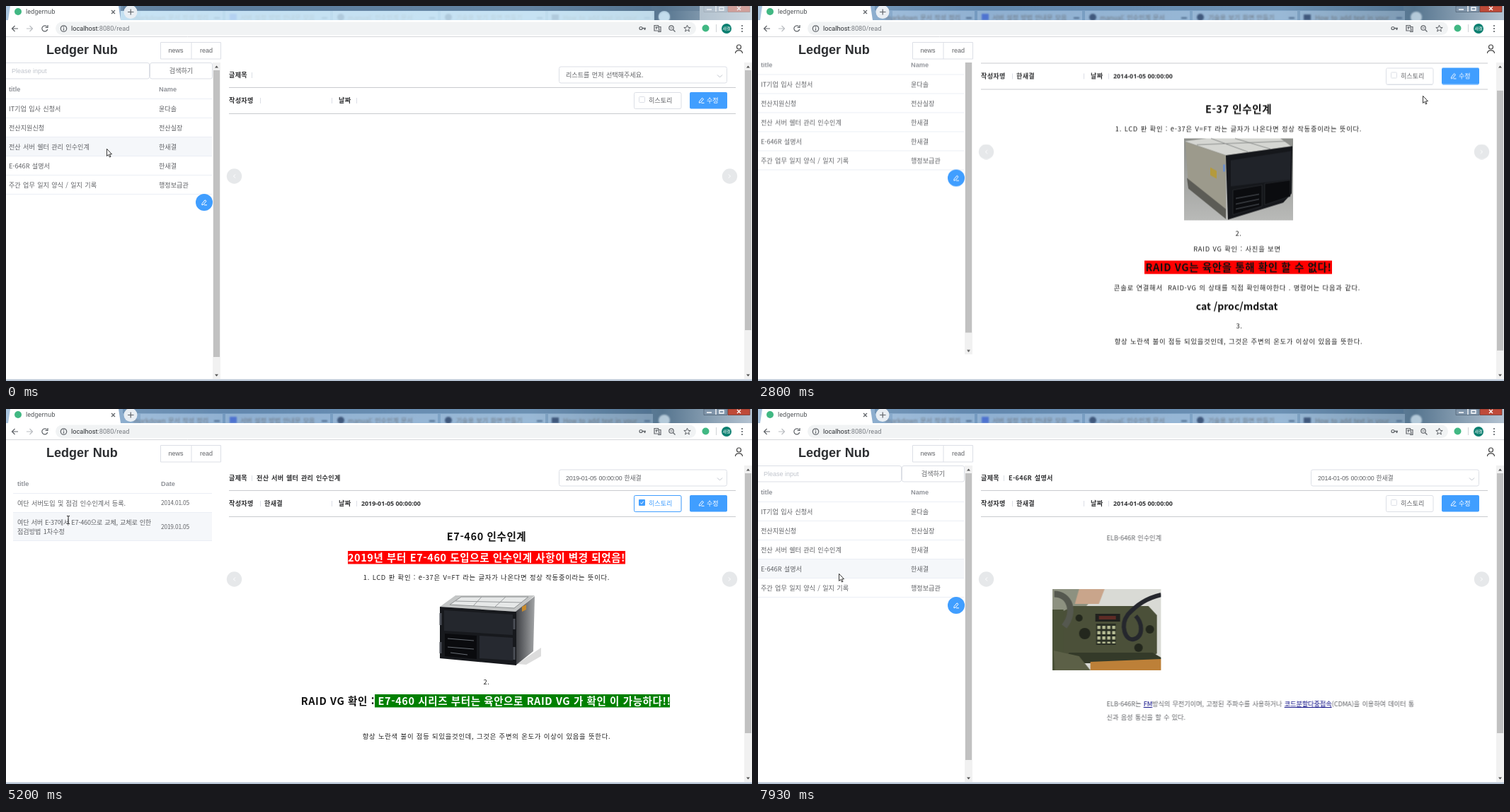
Write an HTML page that moves like this. It is 1054x531 px and loops after 8000 ms.

```html
<!DOCTYPE html>
<html lang="ko">
<head>
<meta charset="utf-8">
<title>ledgernub</title>
<style>
html, body { margin: 0; width: 100%; height: 100%; overflow: hidden; background: #fff; }
svg { display: block; width: 1054px; height: 531px; }
text { font: 9.1px "Noto Sans CJK KR", "Noto Sans", sans-serif; fill: #606266; word-spacing: .8px; white-space: pre; }
.en { font: 9px "Liberation Sans", Arial, sans-serif; word-spacing: 0; }
.th { font: bold 9.2px "Liberation Sans", Arial, sans-serif; fill: #909399; }
.b { font-weight: 700; letter-spacing: .3px; fill: #303133; }
.date { font: 600 8.85px "Noto Sans", sans-serif; fill: #303133; word-spacing: 0; }
.day { font-size: 8.4px; letter-spacing: -.2px; }
.pick { font: 8.9px "Liberation Sans", "Noto Sans CJK KR", sans-serif; letter-spacing: -.2px; }
.mid, .body text { text-anchor: middle; }
.body text { font-size: 9.4px; letter-spacing: .7px; word-spacing: .3px; fill: #222; }
.body .h { font-size: 14.5px; font-weight: 700; letter-spacing: .6px; word-spacing: 0; fill: #111; }
.body .cmd { font-size: 14px; letter-spacing: 0; }
.body .w { fill: #fff; }
.body .l { text-anchor: start; }
.body .r { text-anchor: end; }
.link { fill: #000080; text-decoration: underline; }
.box { fill: #fff; stroke: #dcdfe6; }
.line { stroke: #ebeef5; }
.ico { fill: none; stroke: #5f6368; stroke-width: 1.2; }
.hov { fill: #f5f7fa; }

/* s: hard cuts, f: fades, m: motion */
.s { animation: 8s step-end infinite; }
.f { animation: 8s linear infinite; }
.m { animation: 8s ease-in-out infinite; }
@keyframes focus { 0% { opacity: 1 } 11.625%, to { opacity: 0 } }
@keyframes empty { 0% { opacity: 1 } 13.375%, to { opacity: 0 } }
@keyframes loaded { 0% { opacity: 0 } 13.375%, to { opacity: 1 } }
@keyframes docA { 0% { opacity: 0 } 13.375% { opacity: 1 } 95.875%, to { opacity: 0 } }
@keyframes docB { 0% { opacity: 0 } 95.875%, to { opacity: 1 } }
@keyframes oldRev { 0% { opacity: 0 } 13.375% { opacity: 1 } 60% { opacity: 0 } 95.875%, to { opacity: 1 } }
@keyframes newRev { 0% { opacity: 0 } 60% { opacity: 1 } 95.875%, to { opacity: 0 } }
@keyframes list { 0% { opacity: 1 } 42.5% { opacity: 0 } 82.5%, to { opacity: 1 } }
@keyframes history { 0% { opacity: 0 } 42.5% { opacity: 1 } 82.5%, to { opacity: 0 } }
@keyframes checked { 0%, 42.4% { opacity: 0 } 44.5%, 82.4% { opacity: 1 } 84.5%, to { opacity: 0 } }
@keyframes ring { 0% { opacity: 0 } 82.5% { opacity: 1 } 95.875%, to { opacity: 0 } }
@keyframes row3 { 0%, 18.4% { opacity: 1 } 21.3%, to { opacity: 0 } }
@keyframes row4 { 0%, 89% { opacity: 0 } 91.5%, to { opacity: 1 } }
@keyframes old { 0%, 48.8% { opacity: 0 } 51.6%, 55% { opacity: 1 } 57.5%, to { opacity: 0 } }
@keyframes new { 0%, 45.8% { opacity: 0 } 47.8%, 49.4% { opacity: 1 } 51.9%, 55% { opacity: 0 } 57.5%, 72% { opacity: 1 } 75%, to { opacity: 0 } }
@keyframes edit { 0%, 75.6% { opacity: 0 } 76.5%, 78% { opacity: 1 } 79%, to { opacity: 0 } }
@keyframes scroll {
  0%, 27.5% { transform: translateY(0) } 30%, 33.75% { transform: translateY(-72px) }
  35%, 35.8% { transform: translateY(-34.5px) } 37.2%, to { transform: translateY(0) }
}
@keyframes thumb {
  0%, 27.5% { transform: translateY(0) } 30%, 33.75% { transform: translateY(60px) }
  35%, 35.8% { transform: translateY(28.8px) } 37.2%, to { transform: translateY(0) }
}
@keyframes leave { 0%, 60% { transform: translateX(0) } 65%, to { transform: translateX(-740px) } }
@keyframes enter { 0%, 60% { transform: translateX(740px) } 65%, to { transform: translateX(0) } }
@keyframes backIn { 0% { transform: translateX(-740px) } 5%, to { transform: translateX(0) } }
@keyframes backOut { 0% { transform: translateX(0) } 5%, to { transform: translateX(740px) } }
.back { animation-delay: -.33s; }
@keyframes mouse {
  0%, 16% { transform: translate(142px, 202px) }
  22.4%, 24.1% { transform: translate(937px, 145px) }
  26.6% { transform: translate(934px, 148px) }
  30%, 35.8% { transform: translate(939px, 127px) }
  37.5%, 42.5% { transform: translate(929px, 146px) }
  47.5% { transform: translate(88px, 175px) }
  49.1%, 50% { transform: translate(88px, 140px) }
  51.6%, 53.3% { transform: translate(88px, 138px) }
  56.6%, 70.8% { transform: translate(88px, 157px) }
  77.2% { transform: translate(985px, 136px) }
  80%, 82.5% { transform: translate(925px, 134px) }
  91.6%, to { transform: translate(114px, 233px) }
}
@keyframes arrow { 0% { opacity: 1 } 21.6% { opacity: 0 } 27.5% { opacity: 1 } 38.375% { opacity: 0 } 43.2% { opacity: 1 } 55% { opacity: 0 } 71.8% { opacity: 1 } 76.5% { opacity: 0 } 83.2%, to { opacity: 1 } }
@keyframes hand { 0% { opacity: 0 } 21.6% { opacity: 1 } 27.5% { opacity: 0 } 38.375% { opacity: 1 } 43.2% { opacity: 0 } 76.5% { opacity: 1 } 83.2%, to { opacity: 0 } }
@keyframes beam { 0% { opacity: 0 } 55% { opacity: 1 } 71.8%, to { opacity: 0 } }
</style>
</head>
<body>
<svg viewBox="0 0 1054 531">
<defs>
  <clipPath id="view"><path d="M0 80H1043V528H0z"/></clipPath>
  <clipPath id="stage"><path d="M303 153H1043V600H303z"/></clipPath>
  <clipPath id="photo"><path d="M602 255H756V370H602z"/></clipPath>
  <linearGradient id="glass">
    <stop stop-color="#a9c4de"/><stop offset=".3" stop-color="#7399bf"/>
    <stop offset=".7" stop-color="#83a7c8"/><stop offset=".88" stop-color="#56758f"/><stop offset="1" stop-color="#b4c3d1"/>
  </linearGradient>
  <linearGradient id="steel"><stop stop-color="#3c3e42"/><stop offset="1" stop-color="#a2a4a6"/></linearGradient>
  <linearGradient id="floor" x2="0" y2="1"><stop stop-color="#8d8f8b"/><stop offset="1" stop-color="#b9bab8"/></linearGradient>
  <filter id="blur"><feGaussianBlur stdDeviation="1.3 .9"/></filter>
  <g id="pen" fill="none" stroke="#fff" stroke-width="1"><path d="M-3 1.8L1-3.2L3-1.7L-1 3.2L-3.2 3.6zM0 3.8H4"/></g>
  <path id="up" d="M-2.5 1.5L0-1.5L2.5 1.5z" fill="#505050"/>
  <g id="radio">
    <text class="h" x="679" y="186">ELB-646R 인수인계</text>
    <g clip-path="url(#photo)">
      <path d="M602 255H756V370H602z" fill="#d9dad5"/>
      <path d="M602 255H670L648 282L602 290z" fill="#8d9180"/>
      <path d="M640 255H676L668 276H634z" fill="#c9a58b"/>
      <path d="M602 284H618V370H602z" fill="#4a5138"/>
      <path d="M618 286L632 279H738L750 292V346L738 357H630L618 346z" fill="#4b5039"/>
      <path d="M626 345H744L756 352V360H616z" fill="#343a29"/>
      <path d="M656 358L756 354V370H656z" fill="#bd8038"/>
      <path d="M604 342L640 350L656 370H606z" fill="#5c6047"/>
      <path d="M663 290H698V301H663z" fill="#20211e"/><path d="M668 293H692V298H668z" fill="#5d2b25"/>
      <path d="M664 304H692V334H664z" fill="#2b3025"/>
      <path d="M668 307V332M675 307V332M682 307V332M689 307V332" stroke="#b6bc94" stroke-width="4.5" stroke-dasharray="4.5 3"/>
      <g fill="#23271d"><circle cx="648" cy="318" r="8"/><circle cx="640" cy="296" r="5"/><circle cx="724" cy="338" r="6"/><circle cx="740" cy="312" r="6"/></g>
      <path d="M605 262C626 262 636 286 619 308" fill="none" stroke="#55584f" stroke-width="9"/>
      <path d="M756 263C735 268 722 277 709 291C697 307 706 329 717 326C732 322 729 302 720 293" fill="none" stroke="#25272d" stroke-width="6"/>
    </g>
    <text class="h" x="679" y="421">ELB-646R는 <tspan class="link">FM</tspan>방식의 무전기이며, 고정된 주파수를 사용하거나 <tspan class="link">코드분할다중접속</tspan>(CDMA)을 이용하여 데이터 통</text>
    <text class="h" x="679" y="440">신과 음성 통신을 할 수 있다.</text>
  </g>
</defs>
<path d="M0 0H1054V531H0z" fill="#fff"/>

<g clip-path="url(#view)"><g class="f" style="animation-name:scroll">
  <!-- document list -->
  <g class="s" style="animation-name:list">
    <path class="hov f" style="animation-name:row3" d="M0 185H291V212H0z"/>
    <path class="hov f" style="animation-name:row4" d="M0 212H291V239H0z"/>
    <path class="line" d="M0 131.500H291M0 158.500H291M0 185.500H291M0 212.500H291M0 239.500H291M0 266.500H291"/>
    <rect class="box" x="-2.500" y="80.500" width="205" height="22.500" rx="2.500"/>
    <rect class="box" x="203.500" y="80.500" width="88" height="22.500" rx="2.500"/>
    <text class="en" x="8" y="94.500" style="fill:#c0c4cc">Please input</text>
    <text class="mid" x="247.500" y="95">검색하기</text>
    <text class="th" x="4" y="121">title</text><text class="th" x="216" y="121">Name</text>
    <text x="4" y="148.500">IT기업 입사 신청서</text><text x="216" y="148.500">윤다솔</text>
    <text x="4" y="175.500">전산지원신청</text><text x="216" y="175.500">전산실장</text>
    <text x="4" y="202.500">전산 서버 쉘터 관리 인수인계</text><text x="216" y="202.500">한새결</text>
    <text x="4" y="229.500">E-646R 설명서</text><text x="216" y="229.500">한새결</text>
    <text x="4" y="256.500">주간 업무 일지 양식 / 일지 기록</text><text x="216" y="256.500">행정보급관</text>
    <circle cx="280" cy="278" r="12" fill="#409eff"/><use href="#pen" x="280" y="278"/>
    <path d="M292 80H303V528H292z" fill="#f1f1f1"/><path d="M293 91H302V497H293z" fill="#c1c1c1"/>
    <use href="#up" x="297.500" y="86"/><use href="#up" transform="translate(297.5 523) scale(1 -1)"/>
  </g>

  <!-- revision list -->
  <g class="s" style="animation-name:history">
    <path class="hov f" style="animation-name:old" d="M10 119H291V146H10z"/>
    <path class="hov f" style="animation-name:new" d="M10 146H291V187H10z"/>
    <path class="line" d="M10 119.500H291M10 146.500H291M10 186.500H291"/>
    <text class="th" x="16" y="109">title</text><text class="th" x="219" y="109">Date</text>
    <text x="16" y="136.500">여단 서버도입 및 점검 인수인계서 등록.</text><text class="day" x="219" y="136">2014.01.05</text>
    <text x="16" y="163.500" style="letter-spacing:-.2px">여단 서버 E-37에서 E7-460으로 교체, 교체로 인한</text>
    <text x="16" y="176.500">점검방법 1차수정</text><text class="day" x="219" y="170">2019.01.05</text>
  </g>

  <!-- document head -->
  <path d="M315 115.500H1031M315 152.500H1031" stroke="#c9cbce"/>
  <path d="M347.500 94V102M359.500 130V138M460.500 130V138M495.500 130V138" stroke="#dcdfe6"/>
  <text class="b" x="315" y="101">글제목</text>
  <text class="b" x="315" y="137">작성자명</text>
  <text class="b" x="470" y="137">날짜</text>
  <text class="b s" style="animation-name:docA" x="354" y="101">전산 서버 쉘터 관리 인수인계</text>
  <text class="b s" style="animation-name:docB" x="354" y="101">E-646R 설명서</text>
  <text class="b s" style="animation-name:loaded" x="365" y="137">한새결</text>
  <text class="date s" style="animation-name:oldRev" x="502" y="136.500">2014-01-05 00:00:00</text>
  <text class="date s" style="animation-name:newRev" x="502" y="136.500">2019-01-05 00:00:00</text>
  <rect class="box" x="781.500" y="86" width="237" height="23" rx="2.500"/>
  <path d="M1005 97.500L1008.500 101L1012 97.500" fill="none" stroke="#c0c4cc"/>
  <text class="s" style="animation-name:empty" x="791" y="101">리스트를 먼저 선택해주세요.</text>
  <text class="pick s" style="animation-name:oldRev" x="791" y="100.500">2014-01-05 00:00:00 한새결</text>
  <text class="pick s" style="animation-name:newRev" x="791" y="100.500">2019-01-05 00:00:00 한새결</text>
  <rect class="box" x="887.500" y="122.500" width="66.500" height="23" rx="2"/>
  <rect class="box" x="894.500" y="128.500" width="8" height="8" rx="1"/>
  <text x="908" y="136.500">히스토리</text>
  <rect class="s" style="animation-name:ring" x="894.500" y="128.500" width="8" height="8" rx="1" fill="none" stroke="#409eff"/>
  <g class="f" style="animation-name:checked">
    <rect x="887.500" y="122.500" width="66.500" height="23" rx="2" fill="#fff" stroke="#409eff"/>
    <rect x="894" y="128" width="9" height="9" rx="1" fill="#409eff"/>
    <path d="M896.300 132.600L898 134.400L900.800 130.600" fill="none" stroke="#fff"/>
    <text x="908" y="136.500" style="fill:#409eff">히스토리</text>
  </g>
  <rect x="966" y="122" width="53" height="23.500" rx="2" fill="#409eff"/>
  <rect class="f" style="animation-name:edit" x="966" y="122" width="53" height="23.500" rx="2" fill="#66b1ff"/>
  <use href="#pen" x="982.500" y="133.500"/><text x="990" y="137" style="fill:#fff">수정</text>

  <!-- carousel -->
  <g class="body" clip-path="url(#stage)">
    <g class="s" style="animation-name:loaded"><g class="m" style="animation-name:leave">
      <text class="h" x="679" y="186">E-37 인수인계</text>
      <text x="679" y="211.500">1. LCD 판 확인 : e-37은 V=FT 라는 글자가 나온다면 정상 작동중이라는 뜻이다.</text>
      <path d="M602 222H756V338H602z" fill="url(#floor)"/>
      <path d="M603 226L634 222H738L753 233L662 246z" fill="#d5d6d2"/>
      <path d="M640 222L692 241M674 222L724 237M620 231L745 226" stroke="#8b8d8c" fill="none"/>
      <path d="M604 227L661 246V336L608 291z" fill="#9c9a8c"/>
      <path d="M606 278L661 322V336L608 293z" fill="#5c5c56"/>
      <path d="M661 246L755 233L754 300L742 313L664 337z" fill="#15171b"/>
      <path d="M668 253L753 240L752 280L668 290z" fill="#202329"/>
      <path d="M671 295L712 288V318L671 330zM716 286L752 281V304L716 316z" fill="#0b0c0f" stroke="#33363c" stroke-width=".6"/>
      <path d="M675 307L708 301M675 315L708 308M675 322L708 315" stroke="#555a60"/>
      <path d="M639 263L648 268V279L639 274z" fill="#b49a3d"/><path d="M657 259H660V269H657z" fill="#6f8fc6"/>
      <text x="679" y="359.500">2.</text>
      <text x="677" y="381.500">RAID VG 확인 : 사진을 보면</text>
      <path d="M546 395H811V414H546z" fill="#f00"/>
      <text class="h" x="679" y="410">RAID VG는 육안을 통해 확인 할 수 없다!</text>
      <text x="677" y="436.500">콘솔로 연결해서  RAID-VG 의 상태를 직접 확인해야한다 . 명령어는 다음과 같다.</text>
      <text class="h cmd" x="676.500" y="465">cat /proc/mdstat</text>
      <text x="680" y="490.500">3.</text>
      <text x="679" y="513">항상 노란색 불이 점등 되있을것인데, 그것은 주변의 온도가 이상이 있음을 뜻한다.</text>
    </g></g>
    <g class="s" style="animation-name:newRev"><g class="m" style="animation-name:enter">
      <text class="h" x="679" y="186">E7-460 인수인계</text>
      <path d="M483 201H875V219.500H483z" fill="#f00"/>
      <text class="h w" x="679" y="216">2019년 부터 E7-460 도입으로 인수인계 사항이 변경 되었음!</text>
      <text x="679" y="241.500">1. LCD 판 확인 : e-37은 V=FT 라는 글자가 나온다면 정상 작동중이라는 뜻이다.</text>
      <path d="M722 361L756 338V350L735 362z" fill="#dcdcdc"/>
      <path d="M613 280L635 264H747L721 287z" fill="#c4c6c6"/>
      <path d="M627 277L643 266H738L718 282z" fill="#e6e8e8" stroke="#8d9091"/>
      <path d="M660 279L672 266M690 281L706 266M635 272L729 274" stroke="#979a9c"/>
      <path d="M720 287L747 265L745 343L720 363z" fill="url(#steel)"/>
      <path d="M613 280L721 287V363L613 353z" fill="#17191d"/>
      <path d="M619 285L716 291V320L619 314z" fill="#24272d"/>
      <path d="M620 318L665 321V354L620 350z" fill="#0a0b0e"/><path d="M669 321L716 324V356L669 353z" fill="#262930"/>
      <path d="M624 325L661 328M624 337L661 340M628 345L652 348" stroke="#686d74"/>
      <path d="M614 289V306M614 330V346M718 297V312M718 337V355" stroke="#4a4e56" stroke-width="3"/>
      <path d="M729 280L735 277V284L729 287z" fill="#c98a2b"/>
      <text x="679" y="389.500">2.</text>
      <path d="M521 404H938V422.500H521z" fill="#008000"/>
      <text class="h r" x="521" y="419">RAID VG 확인 :</text>
      <text class="h w l" x="525.500" y="419">E7-460 시리즈 부터는 육안으로 RAID VG 가 확인 이 가능하다!!</text>
      <text x="679" y="467">항상 노란색 불이 점등 되있을것인데, 그것은 주변의 온도가 이상이 있음을 뜻한다.</text>
    </g></g>
    <g class="s" style="animation-name:docB">
      <g class="m back" style="animation-name:backIn"><use href="#radio"/></g>
      <g class="m back" style="animation-name:backOut"><use href="#radio"/></g>
    </g>
  </g>
  <g fill="#1f2d3d" opacity=".11"><circle cx="322.500" cy="241" r="10.700"/><circle cx="1022.500" cy="241" r="10.700"/></g>
  <path d="M324 238.500L321.500 241L324 243.500M1021 238.500L1023.500 241L1021 243.500" fill="none" stroke="#fff"/>
</g></g>

<!-- page scrollbar -->
<path d="M1043 80H1054V528H1043z" fill="#f1f1f1"/>
<path class="f" style="animation-name:thumb" d="M1044 91H1053V459H1044z" fill="#c1c1c1"/>
<use href="#up" x="1048.500" y="86"/><use href="#up" transform="translate(1048.5 523) scale(1 -1)"/>
<path d="M0 528.500H1054V531H0z" fill="#b9c6d6"/>

<!-- page header -->
<text x="57" y="68" style="font:bold 18px 'Liberation Sans',Arial,sans-serif;fill:#2c2e31">Ledger Nub</text>
<path class="box" d="M218.500 51.500H303.500V75H218.500zM262 51.500V75"/>
<text class="en mid" x="240" y="66">news</text><text class="en mid" x="283" y="66">read</text>
<g class="ico" style="stroke:#444"><circle cx="1035.500" cy="58" r="3"/><path d="M1030.500 67C1030.500 61.500 1040.500 61.500 1040.500 67"/></g>

<!-- tab strip -->
<path d="M0 0H1054V20H0z" fill="url(#glass)"/>
<path d="M165 0H912V6H165z" fill="#44688c" opacity=".35"/>
<path d="M190 7H306V20H190zM310 7H458V20H310zM462 7H610V20H462zM614 7H762V20H614zM766 7H914V20H766z" fill="#c2daf0" opacity=".35"/>
<g filter="url(#blur)">
  <g style="opacity:.75"><text x="180" y="20">markdown 문서 작성 정리</text><text x="331" y="20">서버 설정 방법 안내문 모음</text>
  <text x="483" y="20">manual: 인수인계 문서</text><text x="636" y="20">기술용 보기 화면 만들기</text><text x="787" y="20">How to add text in your</text></g>
  <g fill="#41587c"><rect x="316" y="11" width="10" height="9" fill="#4f73d0"/><circle cx="473" cy="16" r="5"/><circle cx="625" cy="16" r="5"/><rect x="771" y="12" width="10" height="8"/></g>
  <path d="M294 17H302M446 17H454M598 17H606M750 17H758M902 17H910" stroke="#4b6688" stroke-width="2"/>
  <circle cx="930" cy="16" r="8" fill="#dcecf8" opacity=".7"/>
</g>
<path d="M986 0H1019V8.500H986z" fill="#8095aa" stroke="#4e6071" stroke-width=".7"/>
<path d="M1020 0H1051V8.500H1020z" fill="#bf4a38" stroke="#6b302a" stroke-width=".7"/>
<path d="M990 5H997M1008 2H1014V6H1008zM1033 1L1038 6M1038 1L1033 6M1003 0V8" fill="none" stroke="#fff" stroke-width="1.300"/>
<g class="s" style="animation-name:focus">
  <path d="M162 7H916V20H162z" fill="#d6f0fc" opacity=".75"/>
  <path d="M162 0H980V7H162z" fill="#5b7690" opacity=".5"/>
  <path d="M980 0H1054V20H980z" fill="#dfe6ec" opacity=".55"/>
  <circle cx="930" cy="15" r="8" fill="#cdeafa" opacity=".6"/>
</g>
<path d="M3 20L6 0H159L162 20z" fill="#fff"/>
<circle cx="17" cy="8" r="5" fill="#41b883"/>
<text x="28" y="11" style="font:8.500px 'Noto Sans',sans-serif;fill:#45494d">ledgernub</text>
<circle cx="176" cy="8.500" r="9.500" fill="#e9eef3"/>
<path class="ico" d="M149 6L154 11M154 6L149 11M172 8.500H180.500M176.200 4.500V12.500"/>

<!-- toolbar -->
<path d="M0 20H1054V44H0z" fill="#fff"/><path d="M0 43.500H1054" stroke="#d5d7da"/>
<rect x="70" y="22.500" width="905" height="18.500" rx="9.200" fill="#f1f3f4"/>
<g class="ico">
  <path d="M17 32H8.500M12.500 28L8.500 32L12.500 36"/>
  <path d="M29 32H37.500M33.500 28L37.500 32L33.500 36" stroke="#babdc1"/>
  <path d="M58 29.500A4 4 0 1 0 58.700 33M59 27V30.500H55.500"/>
  <circle cx="81.500" cy="32" r="4.200"/><path d="M81.500 31.500V34.500M81.500 29.300V30.500"/>
  <circle cx="897" cy="31.500" r="2"/><path d="M899 31.500H904M902.500 31.500V34" stroke-width="1.700"/>
  <path d="M916 27.500H921.500L923 35H916zM921.500 29.500H925V36.500H921M917.500 30H921M919 29V33"/>
  <circle cx="940" cy="31" r="3.200"/><path d="M942.500 33.500L945.500 36.500M938.500 31H941.500"/>
  <path d="M962.500 27L963.800 30.300L967.200 30.500L964.500 32.700L965.400 36L962.500 34.100L959.600 36L960.500 32.700L957.800 30.500L961.200 30.300z" stroke-width="1"/>
</g>
<text x="92" y="35.200" style="font:9.200px Roboto,sans-serif;fill:#2a2d31">localhost<tspan fill="#777b80">:8080/read</tspan></text>
<circle cx="988.500" cy="31.500" r="5" fill="#41b883"/><path d="M1003.500 26V37" stroke="#d0d3d6"/>
<circle cx="1018" cy="32" r="7" fill="#0b7f70"/><text class="mid" x="1018" y="34.300" style="font-size:6px;fill:#fff">새결</text>
<g fill="#5f6368"><circle cx="1040" cy="28" r="1.100"/><circle cx="1040" cy="32" r="1.100"/><circle cx="1040" cy="36" r="1.100"/></g>

<!-- pointer -->
<g class="m" style="animation-name:mouse">
  <path class="s" style="animation-name:arrow" d="M.5 .3V10.500L2.800 8.400L4.400 12L6 11.300L4.400 7.800H7.500z" fill="#fff" stroke="#222" stroke-width=".9"/>
  <path class="s" style="animation-name:hand" d="M-1.500 8V.8C-1.500-.7 .8-.7 .8 .8V5C2-.1+4.600 3 4.600 3 5.300C4.500 4.700 5.200 5 5.200 6C6.500 5.300 7.300 6 7.300 7V10L5.800 14H-.5L-3.700 8.800C-4.300 7.600-2.900 6.800-1.500 8z" fill="#fff" stroke="#222" stroke-width=".9"/>
  <path class="s" style="animation-name:beam" d="M-2-5.500H-.7L0-5L.7-5.500H2M0-5V5M-2 5.500H-.7L0 5L.7 5.500H2" fill="none" stroke="#222"/>
</g>
</svg>
</body>
</html>
```
